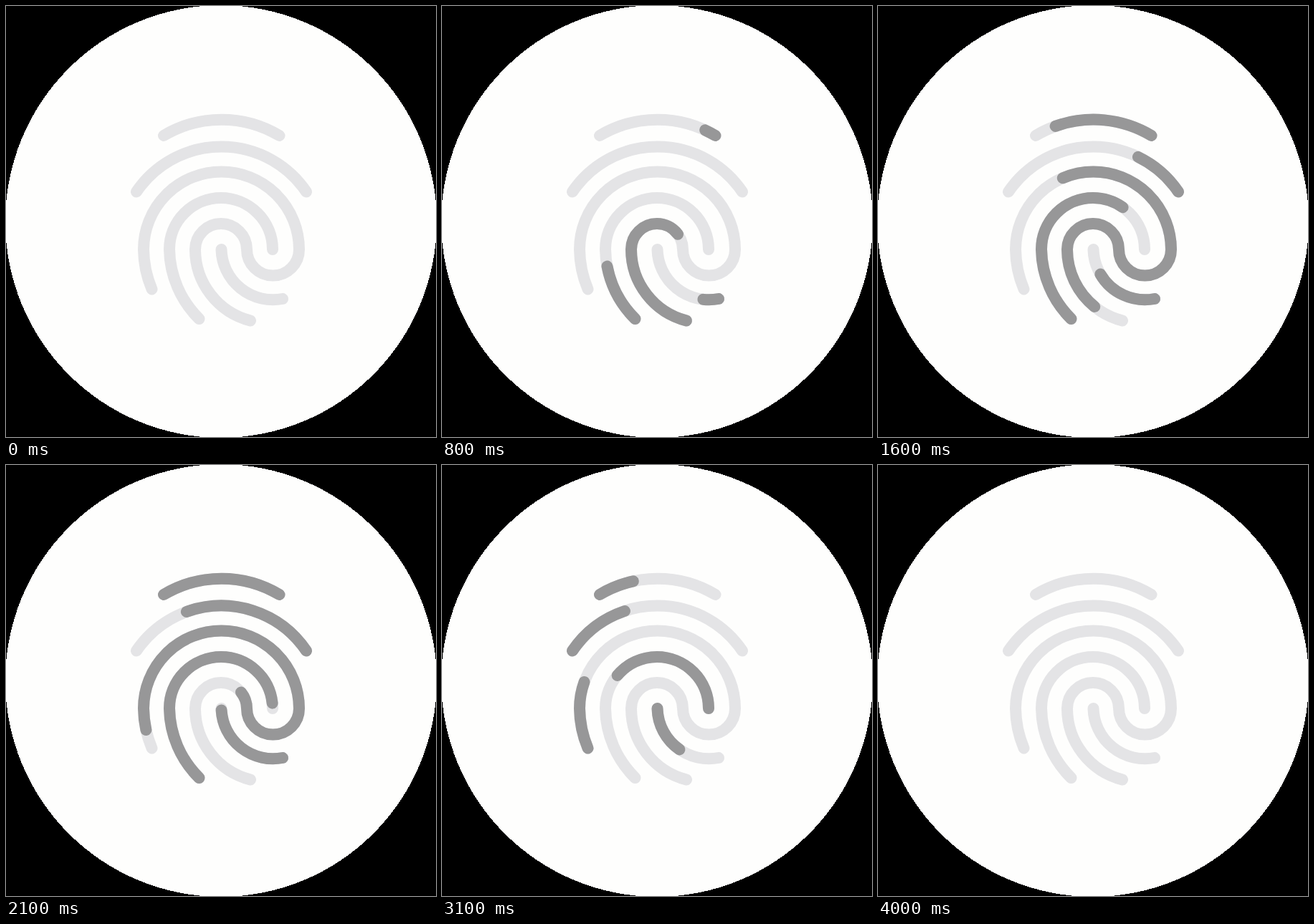
Write an HTML page that moves like this. It is 600 px wide and 602 px high and loops after 4100 ms.

```html
<!DOCTYPE html>
<html lang="en">
<head>
<meta charset="utf-8">
<title>Fingerprint scan</title>
<style>
html, body { margin: 0; width: 100%; height: 100%; overflow: hidden; background: #000; }
svg { display: block; width: 600px; height: 602px; }
ellipse { fill: #fefefd; shape-rendering: crispEdges; }
path { fill: none; stroke-width: 16; stroke-linecap: round; }
.base { stroke: #e4e4e6; }
.trace { stroke: #979798; }
</style>
</head>
<body>
<svg viewBox="0 0 600 602"><ellipse cx="300" cy="301" rx="301" ry="302"/></svg>
<script>
const LOOP = 4100, STEP = 100;

// Each ridge is drawn during head and erased during tail: [start, end, skew]
const ridges = [
  {
    d: 'M381.5 181A157 157 0 0 0 220 181',
    head: [584, 1934], tail: [2160, 3600]
  },
  {
    d: 'M419 259.5A143 143 0 0 0 182 259.5',
    head: [1080, 2690], tail: [2210, 3635]
  },
  {
    d: 'M341 439.5A103 103 0 0 1 264 340A36 36 0 0 1 336 340' +
       'A36.5 36.5 0 0 0 409 340A108.5 108.5 0 0 0 192 340A148 148 0 0 0 203.5 395.5',
    head: [20, 2280], tail: [1360, 3515]
  },
  {
    d: 'M269.5 437A140 140 0 0 1 228 340A72 72 0 0 1 372 340',
    head: [468, 2243, .7], tail: [2390, 3870]
  },
  {
    d: 'M386 409A72 72 0 0 1 300.5 340',
    head: [190, 2190, 1.2], tail: [2465, 3820]
  }
];

const svg = document.querySelector('svg');

function addPath(d, cls) {
  const p = document.createElementNS('http://www.w3.org/2000/svg', 'path');
  p.setAttribute('d', d);
  p.setAttribute('class', cls);
  return svg.appendChild(p);
}

// Gentle ease in and out: part linear, part smoothstep
function progress([start, end, skew = 1], t) {
  const s = Math.min(Math.max((t - start) / (end - start), 0), 1) ** skew;
  return .3 * s + .7 * s * s * (3 - 2 * s);
}

for (const r of ridges) addPath(r.d, 'base');
for (const r of ridges) {
  r.trace = addPath(r.d, 'trace');
  r.length = r.trace.getTotalLength();
}

function draw(t) {
  for (const { trace, length, head, tail } of ridges) {
    const from = progress(tail, t) * length;
    const span = progress(head, t) * length - from;
    trace.style.display = span > 0 ? '' : 'none';
    trace.style.strokeDasharray = `${Math.max(span, 0)} ${2 * length}`;
    trace.style.strokeDashoffset = -from;
  }
}

const start = performance.now();
function tick() {
  const t = (performance.now() - start) % LOOP;
  draw(Math.floor(t / STEP) * STEP);
  requestAnimationFrame(tick);
}
tick();
</script>
</body>
</html>
```
